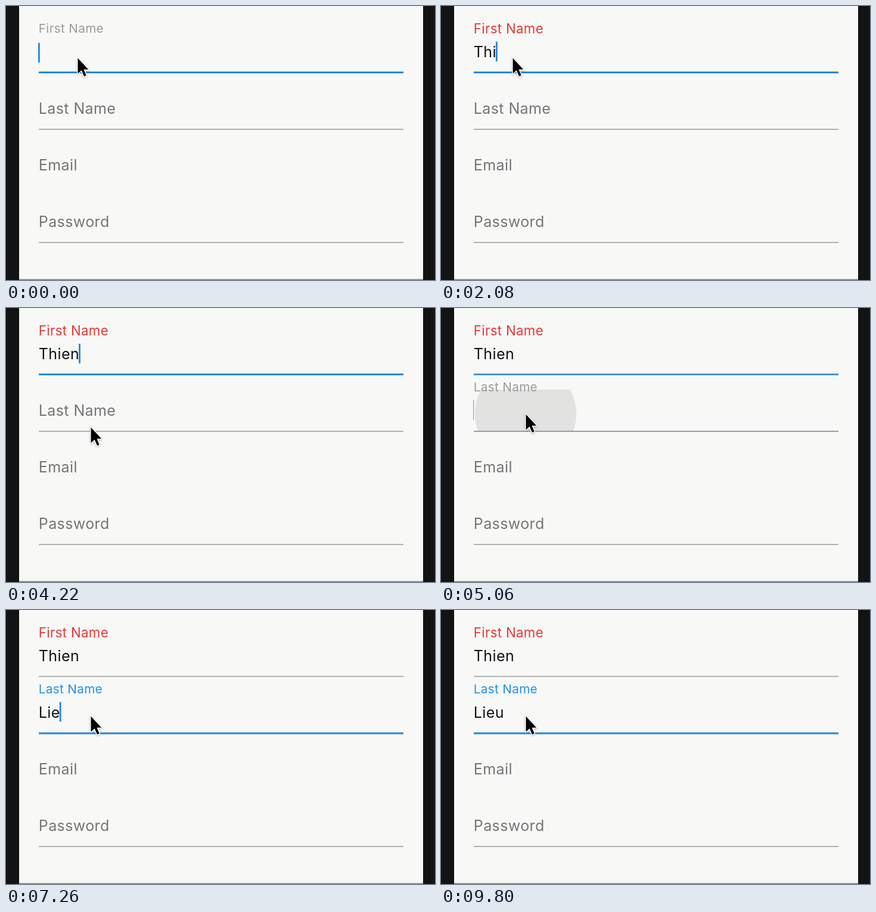
An HTML page with a canvas for the animation above (9.82 s loop, 720 by 460 pixels).

```html
<!DOCTYPE html>
<html lang="en">
<head>
<meta charset="utf-8">
<title>Floating label form</title>
<style>
  html, body { margin: 0; width: 100%; height: 100%; overflow: hidden; }
  canvas { display: block; }
</style>
</head>
<body>
<canvas id="stage" width="720" height="460"></canvas>
<script>
const ctx = document.getElementById('stage').getContext('2d');
const LOOP = 9820, LEFT = 54.8, RIGHT = 667;
const TEXT = 25, SMALL = 20.7, INVALID = 22.2;
const CLICK = 4800, FOCUS = 5020, BLINK = 1200;

const INK = [17, 17, 17], LABEL = [117, 117, 117], FLOATED = [155, 155, 155];
const RED = [229, 57, 53], BLUE = [33, 145, 230], ACTIVE = [30, 136, 225], LINE = [156, 156, 146];

const first = { text: 'Thien', keys: [720, 1250, 1750, 2250, 2650] };
const last = { text: 'Lieu', keys: [5950, 6450, 6950, 7500] };

const ramp = (t, from, to) => Math.min(1, Math.max(0, (t - from) / (to - from)));
const ease = (t, from, to) => { const k = ramp(t, from, to); return k * k * (3 - 2 * k); };
const mix = (a, b, k) => a + (b - a) * k;
const mixColor = (a, b, k) => a.map((v, i) => mix(v, b[i], k));
const rgb = c => `rgb(${c.map(Math.round).join()})`;

function setFont(size) {
  ctx.font = `${size}px Inter, sans-serif`;
  ctx.letterSpacing = size * 0.016 + 'px';
}

function write(text, baseline, size, color) {
  setFont(size);
  ctx.fillStyle = rgb(color);
  ctx.fillText(text, LEFT, baseline);
}

function underline(y, focus) {
  const weight = mix(1.5, 3, focus);
  ctx.fillStyle = rgb(mixColor(LINE, ACTIVE, focus));
  ctx.fillRect(55, y - weight / 2, RIGHT - 55, weight);
}

const pressed = (field, t) => field.keys.filter(k => k <= t);
const typed = (field, t) => field.text.slice(0, pressed(field, t).length);

function caret(field, t, focused, top) {
  const text = typed(field, t);
  const since = (t - Math.max(focused, ...pressed(field, t))) % BLINK;
  const appear = focused ? ramp(t, focused, focused + 100) : 1;
  setFont(TEXT);
  const x = text ? LEFT + ctx.measureText(text).width - 1 : 54;
  ctx.globalAlpha = (1 - ramp(since, 600, 750) + ramp(since, 1120, BLINK)) * mix(0.5, 1, appear);
  ctx.fillStyle = rgb(ACTIVE);
  ctx.fillRect(x, top, 2.8 * appear, 33);
  ctx.globalAlpha = 1;
}

function ripple(t) {
  const fade = 1 - ramp(t, 5080, 5450);
  if (t < CLICK || !fade) return;
  ctx.save();
  ctx.beginPath();
  ctx.rect(55, 137, RIGHT - 55, 70);
  ctx.clip();
  ctx.beginPath();
  ctx.arc(142, 178, 10 + (t - CLICK) * 0.288, 0, 2 * Math.PI);
  ctx.fillStyle = `rgba(0,0,0,${0.09 * fade})`;
  ctx.fill();
  ctx.restore();
}

function pointer(t) {
  const move = ease(t, 3500, 4050);
  const x = mix(120.5, 142.5, move);
  const y = mix(87.5, 200.5, move) - 22 * ease(t, 4320, 4620);
  const arrow = new Path2D('M0 0V26L6.2 20.5L10.5 30.5L14.2 29L10 19H17.8Z');
  ctx.save();
  ctx.translate(x, y);
  ctx.shadowColor = 'rgba(60,60,60,.4)';
  ctx.shadowBlur = 3;
  ctx.shadowOffsetY = 1;
  ctx.lineWidth = 3;
  ctx.lineJoin = 'round';
  ctx.strokeStyle = '#fff';
  ctx.stroke(arrow);
  ctx.shadowColor = 'transparent';
  ctx.fillStyle = '#000';
  ctx.fill(arrow);
  ctx.restore();
}

function draw(t) {
  ctx.fillStyle = '#131313';
  ctx.fillRect(0, 0, 720, 460);
  ctx.fillStyle = '#f8f8f7';
  ctx.fillRect(22, 0, 678, 460);
  ctx.fillStyle = '#85857c';
  ctx.fillRect(22, 458.5, 678, 1.5);

  ripple(t);

  const invalid = ease(t, 720, 930);
  write('First Name', 45 + invalid, mix(SMALL, INVALID, invalid), mixColor(FLOATED, RED, invalid));
  write(typed(first, t), 86, TEXT, INK);

  const float = ease(t, CLICK, FOCUS);
  const valid = ease(t, last.keys[0], last.keys[0] + 200);
  write('Last Name', mix(181, 140, float), mix(TEXT, SMALL, float),
    mixColor(mixColor(LABEL, FLOATED, float), BLUE, valid));
  write(typed(last, t), 181, TEXT, INK);

  write('Email', 276, TEXT, LABEL);
  write('Password', 371, TEXT, LABEL);

  const handover = ramp(t, FOCUS, 5240);
  underline(111.5, 1 - handover);
  underline(207, handover);
  underline(397, 0);

  if (t < FOCUS) caret(first, t, 0, t < first.keys[0] ? 62 : 60);
  else caret(last, t, FOCUS, 154.5);
  pointer(t);
}

function tick() {
  draw(performance.now() % LOOP);
  requestAnimationFrame(tick);
}
tick();
</script>
</body>
</html>
```
